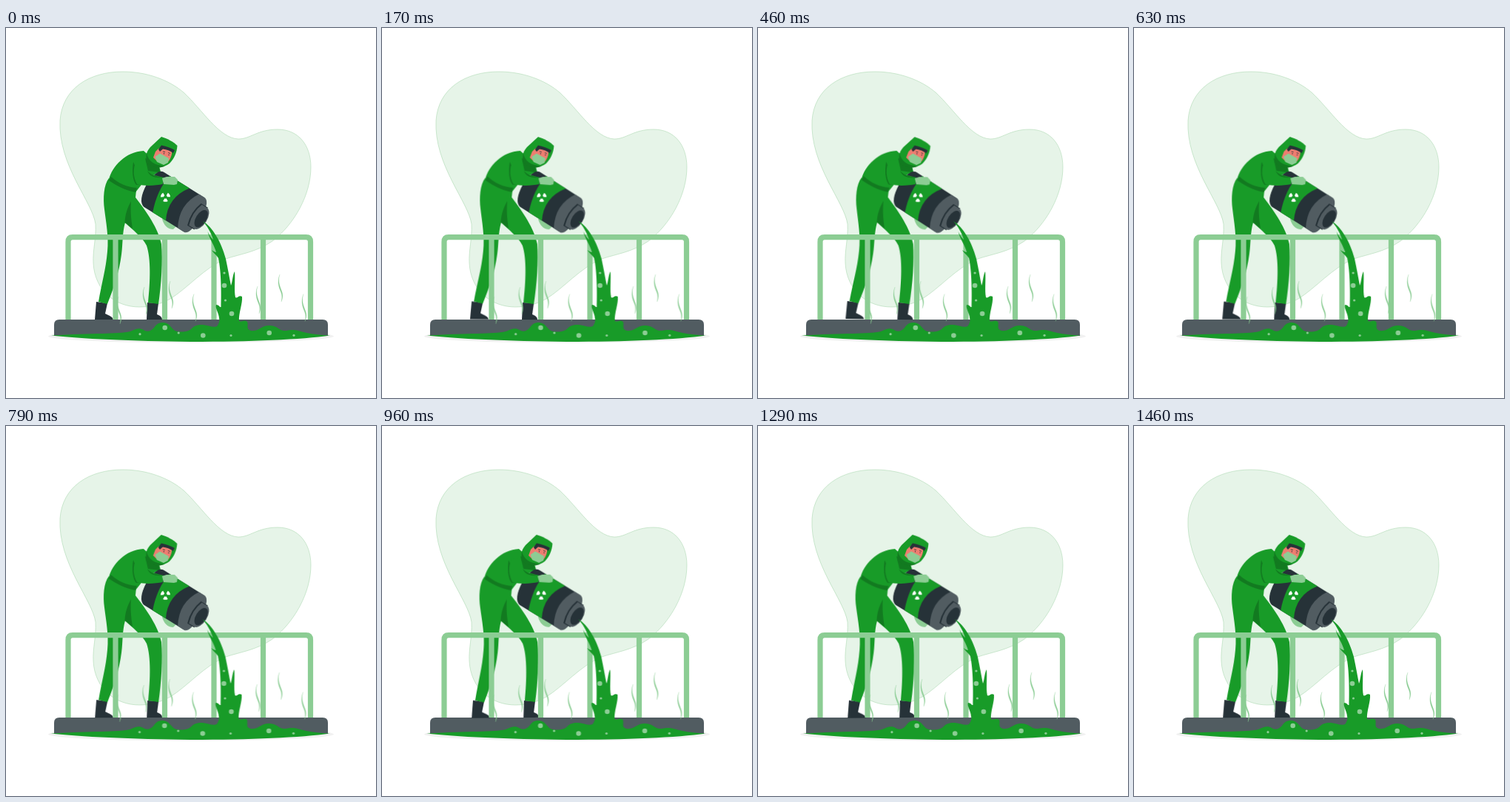
An HTML page without scripts for the animation above (1.5 s loop, 500x500 px).

```html
<!DOCTYPE html>
<html lang="en">
<head>
<meta charset="utf-8">
<title>Toxic spill</title>
<style>
  html, body { margin: 0; width: 100%; height: 100%; overflow: hidden; background: #fff; }
  svg { display: block; width: 100vw; height: 100vh; }
  .green { fill: #189b28; }
  .shade { fill: #127a20; }
  .light { fill: #8ccd94; }
  .dark { fill: #263238; }
  .gray { fill: #515c61; }
  .skin { fill: #ee7d70; }
  .rail { fill: none; stroke: #8ccd94; stroke-width: 7.2; }
  .worker { transform-origin: 197px 271px; animation: sway 1.5s linear infinite; }
  .spill { animation: shake 1.5s cubic-bezier(.36, .07, .19, .97) infinite; }
  @keyframes sway {
    25% { transform: rotate(1deg); }
    75% { transform: rotate(-1deg); }
  }
  @keyframes shake {
    10%, 90% { transform: translateX(-.5px); }
    20% { transform: translateX(1.3px); }
    80% { transform: translateX(2.2px); }
    30%, 50%, 70% { transform: translateX(-2px); }
    40%, 60% { transform: translateX(2px); }
  }
</style>
</head>
<body>
<svg viewBox="0 0 500 500">
  <defs>
    <path id="steam" d="M0 0C-3 9 0 15 2 21C5 28 4 32 2 37C3 32 3.500 28 .7 22C-2 15-3.500 9 0 0Z" stroke="#8ccd94" stroke-width=".2"/>
    <circle id="big" r="3.3"/>
    <circle id="small" r="1.6"/>
  </defs>

  <path fill="#e6f4e8" stroke="#a0d3a7" stroke-width=".5" d="M73 125C76 82 112 59 158 59C190 59 220 70 240 87C265 110 288 149 314 150C330 150 340 137 367 137C395 137 412 158 412 188C412 225 390 265 360 288C338 303 318 305 297 312C268 324 245 352 222 366C205 375 192 377 180 377C148 377 120 355 118 318C117 300 122 285 121 265C117 235 70 185 73 125Z"/>
  <ellipse cx="250" cy="416.5" rx="193" ry="9" fill="#f1f1f1"/>
  <path class="gray" d="M65 416V401q0-7 7-7H428q7 0 7 7V416Z"/>

  <g class="worker">
    <path class="light" d="M211 258C213 266 218 272 226 272L230 268L216 257Z"/>
    <!-- legs -->
    <path class="dark" d="M122 370L137 372L134 386C140 389 144 390 145 394H120Z"/>
    <path class="dark" d="M191 371L206 372L204 387C209 389 211 391 211 394H190Z"/>
    <path class="green" d="M139 203C132 212 131 230 133 245C135 262 139 282 137 302C135 326 129 346 125 370L137 373C146 350 153 330 156 306C158 290 157 277 161 263C170 272 184 282 190 294C196 312 195 342 192 371L206 373C210 346 212 314 210 292C206 274 196 256 175 229L176 219Z"/>
    <path class="shade" d="M169 234C164 243 161 252 160.500 263C165 266 168 269 171 271C169 258 168 248 169 234Z"/>
    <!-- jacket -->
    <path class="green" d="M139 205C143 187 162 167 186 166L206 184L209 194L190 203L175 222C162 219 149 213 139 205Z"/>
    <path class="shade" d="M142 201C152 210 163 215 177 216L175 222C160 219 149 213 139 206Z"/>
    <path class="shade" d="M172 181C170 194 171 206 176 212L184 211L178 195Z"/>
    <path class="shade" d="M188 176L207 188L208 195L192 193Z"/>
    <!-- barrel -->
    <g transform="translate(230 236) rotate(32)">
      <path class="dark" d="M-36-26H28Q36-25 36 0Q36 28 28 28H-34Q-45 26-47 0Q-46-26-36-26Z"/>
      <path class="green" d="M-27-26H5Q-14 0 1 28H-20Q-31 0-27-26Z"/>
      <path class="gray" d="M20-26H30Q39-23 39 1Q38 28 30 28H20Q4 0 20-26Z"/>
      <path class="dark" d="M29-17H40V18H29Q23 0 29-17Z"/>
      <path class="gray" d="M31-16H40V17H31Q25 0 31-16Z"/>
      <ellipse class="gray" cx="39" cy=".5" rx="9" ry="16.5"/>
      <ellipse class="dark" cx="40" cy=".5" rx="7" ry="13"/>
    </g>
    <circle cx="215.5" cy="228.3" r="4.4" fill="none" stroke="#fff" stroke-width="4.2" pathLength="6" stroke-dasharray="1" transform="rotate(60 215.5 228.3)"/>
    <!-- arm -->
    <path class="green" d="M176 180C185 176 190 183 191 192C197 199 205 200 213 202L212 211C202 213 188 214 177 211C172 202 171 190 176 180Z"/>
    <path class="shade" d="M191 193C196 199 204 201 212 202C202 203 194 201 191 193Z"/>
    <path class="light" d="M211 203L217 201L228 201L232 205L231 211L227 212L213 211Z"/>
    <!-- head -->
    <path class="green" d="M210 147C217 149 227 154 231.500 159C231 168 227 177 221 183C214 189 202 189 195 184C186 177 189 168 195 161Z"/>
    <path class="shade" d="M190 169C192 180 201 186 215 186.500C206 191 196 188 189 181Z"/>
    <path class="skin" d="M206 163L212 161L224 165C225 171 222 178 218 182L204 180L199 175L202 167Z"/>
    <path class="dark" d="M206 164L210 158.500C217 160 223 162 228 165L226 169C222 166 217 164 212 163.500L208 167Z"/>
    <path class="light" d="M201.500 174L208 169.500L220 176L219 182L213 185L204 181Z"/>
    <path d="M212 167l3 .5m4 1l3 1" fill="none" stroke="#263238" stroke-width=".8"/>
    <circle cx="213.5" cy="169.800" r=".7" class="dark"/>
    <circle cx="220" cy="171.500" r=".7" class="dark"/>
  </g>

  <path class="rail" d="M84 394V289q0-6.300 6-6.300H405.500q6 0 6 6.300V394M148 283V394M214.500 283V394M281 283V394M347.500 283V394"/>

  <g class="spill">
    <path class="green" d="M266 261C279 269 291 289 297 312C300 326 302 338 304 348C306 344 306 334 309 329C310 340 308 355 310 364C312 366 315 360 319 363C320 372 314 386 315 396C318 398 322 394 326 397C328 401 324 406 330 410H282C284 402 290 400 288 392C288 386 282 378 284 374C288 374 289 378 290.500 377C291 360 291 330 287 311C284 306 280 304 278 300C280 302 283 303 284 303C282 294 275 286 272.500 275C275 281 278 284 280 286C277 276 272 268 266 261Z"/>
    <path class="green" d="M61 415.500C120 412 150 414 168 410C176 406 181 405 186 408C190 411 196 410 200 405C204 399 207 398 213 398C223 399 223 408 231 410C238 411 246 411 251 406C256 401 261 401 266 401C275 402 280 406 288 402H323C325 405 328 410 335 409C344 408 345 402 356 402C370 403 368 410 379 409C396 405 396 414 438 415.500C400 421 330 424 250 424C170 423 100 420 61 415.500Z"/>
    <g class="light">
      <use href="#small" x="295" y="331"/>
      <use href="#big" x="295" y="348"/>
      <use href="#small" x="296.500" y="368"/>
      <use href="#big" x="305" y="386"/>
      <use href="#small" x="304" y="415.500"/>
      <use href="#big" x="214.700" y="405"/>
      <use href="#small" x="233.200" y="412"/>
      <use href="#small" x="181" y="413.700"/>
      <use href="#big" x="266.300" y="415.500"/>
      <use href="#big" x="355.700" y="412"/>
      <use href="#small" x="389" y="415.300"/>
      <use href="#steam" x="152" y="363"/>
      <use href="#steam" x="187" y="350"/>
      <use href="#steam" x="222" y="342"/>
      <use href="#steam" x="254" y="359.500"/>
      <use href="#steam" x="340" y="349"/>
      <use href="#steam" x="370" y="333"/>
      <use href="#steam" x="402" y="359.500"/>
    </g>
  </g>
</svg>
</body>
</html>
```
